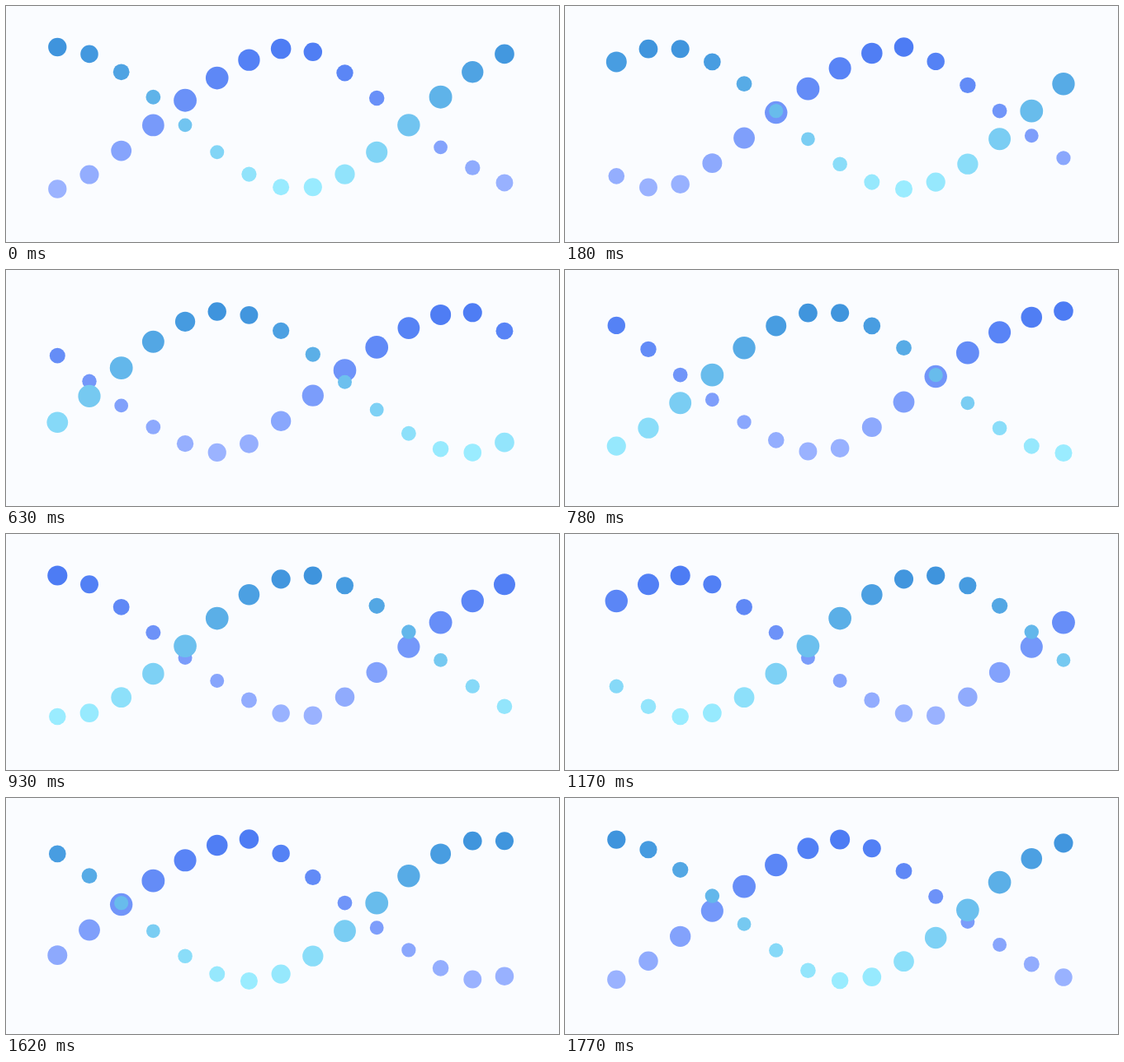
An HTML page for the animation above (1.8 s loop, 670x287 px).

```html
<!DOCTYPE html>
<html lang="en">
<head>
<meta charset="utf-8">
<title>Double helix loader</title>
<style>
  html, body { margin: 0; width: 100%; height: 100%; overflow: hidden; background: #fafcff; }
  svg { display: block; width: 100%; height: 100%; }
</style>
</head>
<body>
<svg id="stage" viewBox="0 0 670 287"></svg>
<script>
const LOOP = 1800, STEP = 30, DELAY = 120, COLUMNS = 15;
const LEFT = 62.3, GAP = 38.69, TOP = 50, BOTTOM = 222.5, RADIUS = 11.15;

const mix = (a, b, k) => a + (b - a) * k;

// Cubic easing with flat ends; x1 and x2 are the handle positions in time.
const easing = (x1, x2) => x => {
  let low = 0, high = 1;
  for (let i = 0; i < 24; i++) {
    const s = (low + high) / 2, r = 1 - s;
    if (3 * r * r * s * x1 + 3 * r * s * s * x2 + s * s * s < x) low = s;
    else high = s;
  }
  return low * low * (3 - 2 * low);
};
const smooth = easing(1 / 3, 2 / 3);

function keyframes(keys, time, ease) {
  const next = keys.findIndex(key => key[0] > time);
  const [t0, v0] = keys[next - 1], [t1, v1] = keys[next];
  return mix(v0, v1, ease((time - t0) / (t1 - t0)));
}

const pulse = amount => [[0, 1], [370, 1 + amount], [1290, 1 - amount], [LOOP, 1]];

// Depth runs from 0 at the top to 1 at the bottom. The later strand lies in front.
const strands = [
  { depth: [[0, 1], [900, 0], [LOOP, 1]], scale: pulse(-0.25), ease: easing(1 / 3, 5 / 6),
    topColor: [77, 124, 244], bottomColor: [155, 179, 255] },
  { depth: [[0, 0], [900, 1], [LOOP, 0]], scale: pulse(0.25), ease: smooth,
    topColor: [63, 148, 221], bottomColor: [154, 236, 255] }
];

const stage = document.getElementById("stage");
for (const strand of strands) {
  strand.dots = Array.from({ length: COLUMNS }, (_, i) => {
    const dot = document.createElementNS("http://www.w3.org/2000/svg", "circle");
    dot.setAttribute("cx", LEFT + GAP * i);
    return stage.appendChild(dot);
  });
}

function draw(time) {
  for (const { dots, depth, scale, ease, topColor, bottomColor } of strands) {
    dots.forEach((dot, i) => {
      const local = (time - DELAY * i + LOOP) % LOOP;
      const level = keyframes(depth, local, ease);
      const color = topColor.map((c, n) => Math.round(mix(c, bottomColor[n], level)));
      dot.setAttribute("cy", mix(TOP, BOTTOM, level).toFixed(2));
      dot.setAttribute("r", (RADIUS * keyframes(scale, local, smooth)).toFixed(2));
      dot.setAttribute("fill", `rgb(${color})`);
    });
  }
}

const start = performance.now();
function tick(now) {
  const elapsed = Math.max(0, now - start);
  draw(Math.floor((elapsed + 2) / STEP) * STEP % LOOP);
  requestAnimationFrame(tick);
}
draw(0);
requestAnimationFrame(tick);
</script>
</body>
</html>
```
